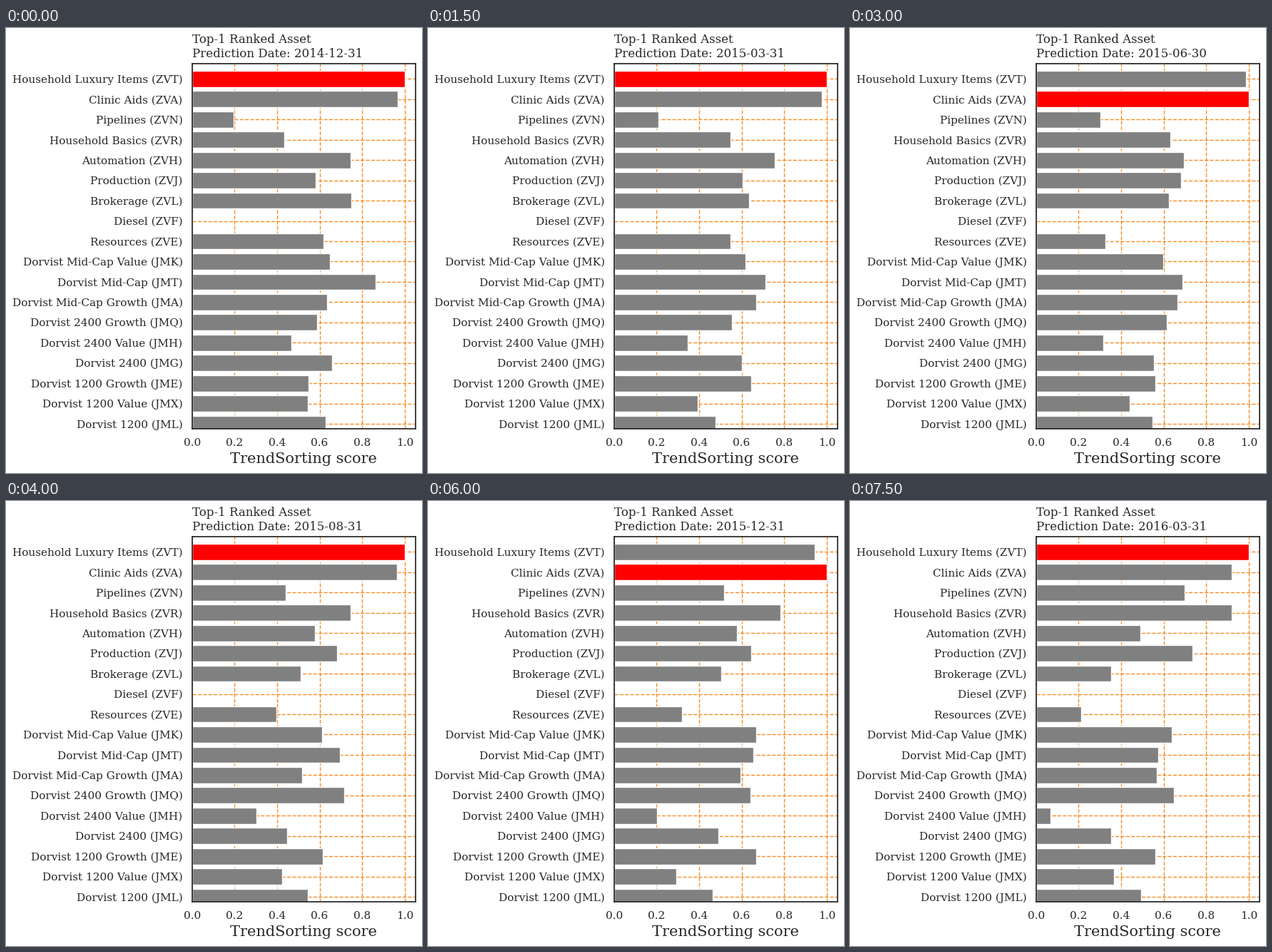
A matplotlib script that plays this animation: 583 by 624 pixels, repeating every 8000 ms.

```python
import matplotlib.pyplot as plt
import numpy as np
from matplotlib.animation import FuncAnimation

W, H, DPI = 583, 624, 100
LEFT, TOP, RIGHT, BOTTOM = 260.75, 50.09, 573.75, 562.14
INK = "#262626"
GRID = "#fb8a22"
MONTHS = 16

plt.rcParams["font.family"] = "DejaVu Serif"
for key in ("text.color", "axes.labelcolor", "axes.edgecolor",
            "xtick.color", "ytick.color"):
    plt.rcParams[key] = INK

# Label: typical score at the first and the last month, from top to bottom
ASSETS = {
    "Household Luxury Items (ZVT)": (1, 1),
    "Clinic Aids (ZVA)": (1, 1),
    "Pipelines (ZVN)": (0.12, 0.66),
    "Household Basics (ZVR)": (0.50, 0.86),
    "Automation (ZVH)": (0.73, 0.48),
    "Production (ZVJ)": (0.60, 0.68),
    "Brokerage (ZVL)": (0.70, 0.38),
    "Diesel (ZVF)": (0, 0),
    "Resources (ZVE)": (0.56, 0.17),
    "Dorvist Mid-Cap Value (JMK)": (0.64, 0.62),
    "Dorvist Mid-Cap (JMT)": (0.80, 0.52),
    "Dorvist Mid-Cap Growth (JMA)": (0.64, 0.54),
    "Dorvist 2400 Growth (JMQ)": (0.60, 0.69),
    "Dorvist 2400 Value (JMH)": (0.42, 0.14),
    "Dorvist 2400 (JMG)": (0.58, 0.38),
    "Dorvist 1200 Growth (JME)": (0.57, 0.61),
    "Dorvist 1200 Value (JMX)": (0.47, 0.30),
    "Dorvist 1200 (JML)": (0.56, 0.49),
}
LUXURY, CLINIC, DIESEL = 0, 1, 7
CLINIC_LEADS = {2, 6, 7, 12, 13, 14}


def build_scores(rng):
    """Linear trends with monthly noise; the top two rows trade the lead."""
    start, end = np.array(list(ASSETS.values())).T
    scores = np.linspace(start, end, MONTHS)
    scores += rng.uniform(-0.08, 0.08, scores.shape)
    scores[:, DIESEL] = 0
    for month, row in enumerate(scores):
        leader, second = LUXURY, CLINIC
        if month in CLINIC_LEADS:
            leader, second = second, leader
        row[leader] = 1
        row[second] = rng.uniform(0.9, 0.99)
    return scores.clip(0, 1)


def month_end(i):
    first = (np.datetime64("2015-01", "M") + i).astype("datetime64[D]")
    # Leap days are ignored
    return str(first - 1).replace("02-29", "02-28")


scores = build_scores(np.random.default_rng(4))
n = len(ASSETS)
rows = np.arange(n)[::-1]

fig = plt.figure(figsize=(W / DPI, H / DPI), dpi=DPI, facecolor="white")
ax = fig.add_axes([LEFT / W, 1 - BOTTOM / H,
                   (RIGHT - LEFT) / W, (BOTTOM - TOP) / H])
ax.set_axisbelow(True)
ax.grid(True, color=GRID, linestyle="--", linewidth=1)
bars = ax.barh(rows, scores[0], height=0.8, color="gray",
               edgecolor="white", linewidth=1)
ax.set_xlim(0, 1.05)
ax.set_ylim(-0.25, n - 0.25)
ax.set_xticks(np.linspace(0, 1, 6))
ax.set_yticks(rows, list(ASSETS))
ax.tick_params(length=0, pad=9.5, labelsize=11)
ax.set_xlabel("TrendSorting score", fontsize=15)
for spine in ax.spines.values():
    spine.set_linewidth(1.25)
title = ax.set_title("", loc="left", fontsize=12, pad=6.7)


def update(i):
    leader = np.argmax(scores[i])
    for row, (bar, score) in enumerate(zip(bars, scores[i])):
        bar.set_width(score)
        bar.set_facecolor("red" if row == leader else "gray")
    title.set_text(f"Top-1 Ranked Asset\nPrediction Date: {month_end(i)}")
    return [*bars, title]


anim = FuncAnimation(fig, update, frames=MONTHS, interval=500,
                     repeat=True, repeat_delay=0, blit=False)
plt.show()
```
